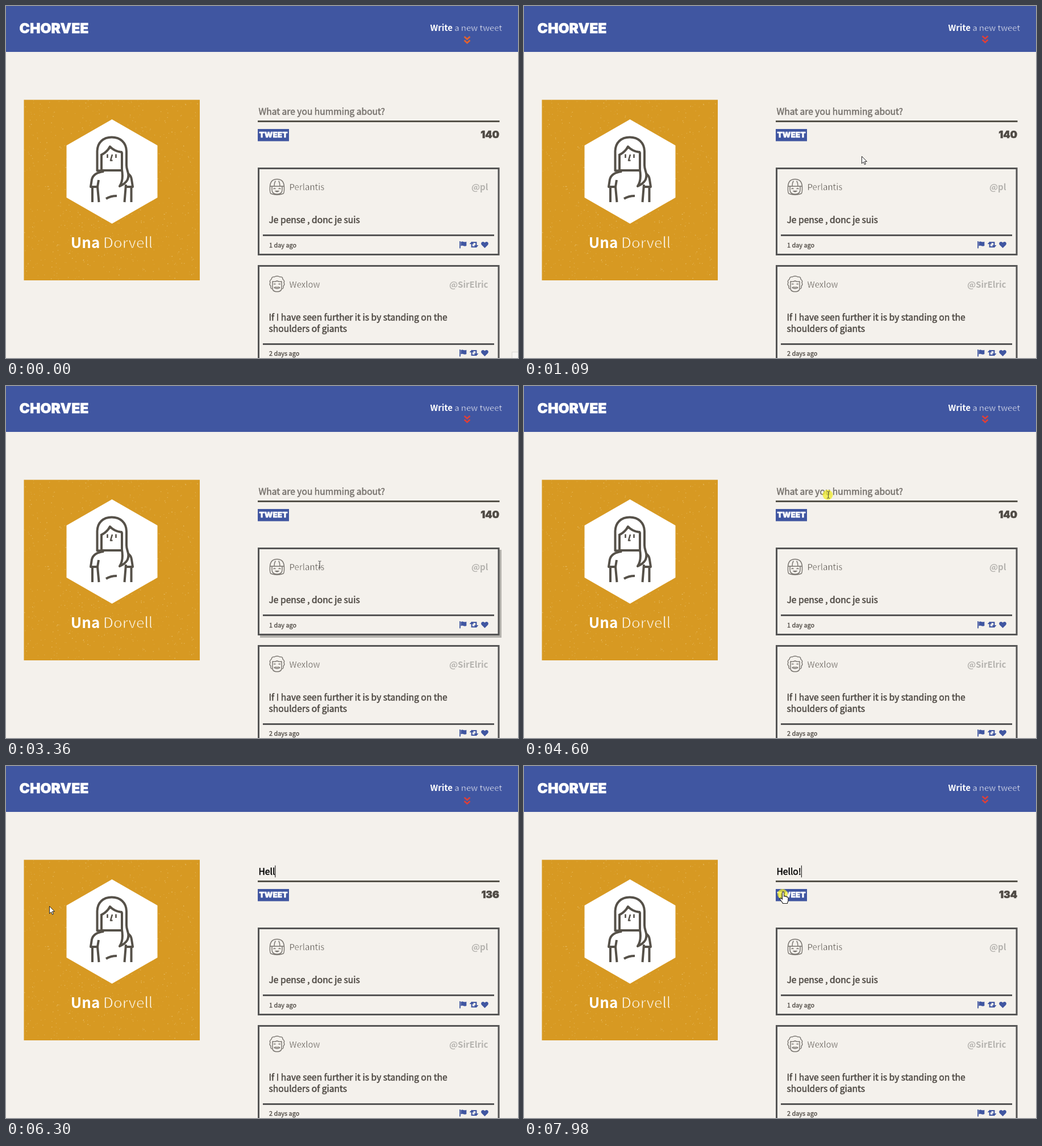
An HTML page that plays this animation: 901 px wide and 621 px high, repeating every 8000 ms.

```html
<!DOCTYPE html>
<html lang="en">
<head>
<meta charset="utf-8">
<title>Short messages</title>
<style>
html, body { margin: 0; width: 100%; height: 100%; overflow: hidden; background: #f4f1ec; }
svg { display: block; width: 100vw; height: 100vh; }
text {
  font: 400 15.6px "Noto Sans CJK JP", "Noto Sans CJK SC", "Noto Sans", sans-serif;
  color: #4f4a44; fill: currentColor; stroke: currentColor; stroke-width: .5; white-space: pre;
}
/* a stroke in the backdrop's colour thins the letters */
.light { font-size: 15px; stroke: #f4f1ec; stroke-width: .45; }
.bold { font-weight: 700; stroke: none; }
.end { text-anchor: end; }
.mid { text-anchor: middle; }
.white { color: #fff; }
.handle { font-size: 15px; font-weight: 700; color: #b5b3af; stroke: none; }
.date { font-size: 10.9px; stroke-width: .3; }
.block { font-family: Inter, "Liberation Sans", sans-serif; font-weight: 900; }
.line { fill: none; stroke: #565149; stroke-linecap: butt; stroke-linejoin: round; }
.thin { fill: none; stroke: #77736e; stroke-width: 1.4; stroke-linejoin: round; stroke-linecap: round; }
</style>
</head>
<body>
<svg viewBox="0 0 901 621">
  <defs>
    <g id="icons" fill="#4056a1">
      <path d="M798 -6h1.8v12.500h-1.800zM800.300 -4.800c3.500-2 5.500 1.500 10-.500v7.300c-4.500 2-6.500-1.500-10 .500z"/>
      <path d="M819.500 -5.500l4 4.500h-2.700v4h5l1.800 2h-9v-6h-3zM827.500 5.500l-4-4.500h2.700v-4h-5l-1.800-2h9v6h3z"/>
      <path d="M842.500 6l-5.300-5.300c-3-3.200.8-8.300 5.300-4.300c4.500-4 8.300 1.100 5.300 4.300z"/>
    </g>
    <path id="arrow" d="M.5.500v12.800l3-2.800 2 4.600 2-.9-2-4.500h4z" fill="#fff" stroke="#222" stroke-width="1"/>
    <path id="ibeam" d="M-2.500-6h1.700l.8.800.8-.8H2.500M0-5.200V5.200M-2.500 6h1.700l.8-.8.8.8H2.500" fill="none" stroke="#333" stroke-width=".9"/>
    <path id="hand" d="M-1.500 7V-2.500c0-2.200 3-2.200 3 0V4c.8-1 2.500-.8 2.700.5c1-.8 2.400-.3 2.500.8c1-.5 2.200.2 2.200 1.200v5c0 2-1.500 3-1.500 5H-.5c0-2-4.500-5-5-8c-.2-1.800 2-2 4 .5z" fill="#fff" stroke="#222" stroke-width="1.100"/>
  </defs>

  <rect width="901" height="621" fill="#f4f1ec"/>
  <rect width="901" height="81" fill="#4056a1"/>
  <text class="block white" x="23.500" y="47.800" style="font-size:24.700px">CHORVEE</text>
  <text class="light white end" x="873" y="44" style="stroke:#4056a1;font-size:14.900px"><tspan class="bold">Write</tspan> a new tweet</text>
  <path id="chevron" d="M-5-5.500L0-1L5-5.500M-5 1L0 5.500L5 1" fill="none" stroke-width="2.800"/>

  <rect x="31.500" y="165.500" width="309.500" height="318.500" fill="#d79922"/>
  <g id="specks" fill="#f3d898"></g>
  <path d="M186.500 200L266.500 246V338L186.500 384L106.500 338V246z" fill="#fff"/>
  <g class="line" stroke-width="4">
    <path d="M173 290.500H160.500V257C160.500 241 171 231.500 186 231.500S212 241 212 257V281C212 291 218 295 214 306Q211 313 200 318Q207 308 204 289"/>
    <path d="M168 261V290H204V258M167 263Q178 258 183 248Q191 257 205 258"/>
    <path d="M172 292Q154 294 151 306L149 319H161L163 307M161 319L163.500 346M152 319V346M211 319H223L221 306Q220 299 215 296M211 315L208.500 346M220.500 319V346"/>
    <path d="M176 340Q184 335 195 335"/>
    <path d="M178.500 261.500V268M193.500 261.500V268M187 262L184 272.500H187.500" stroke-width="2.600"/>
  </g>
  <text class="light white mid" x="186" y="427" style="stroke:#d79922;stroke-width:.8;font-size:26px"><tspan class="bold">Una</tspan> Dorvell</text>

  <text id="field" x="444.500" y="192"></text>
  <rect id="caret" y="175.500" width="1" height="21" fill="#000"/>
  <rect x="443" y="202" width="425.500" height="3" fill="#555249"/>
  <rect x="443" y="217" width="55" height="21.500" fill="#4056a1"/>
  <text class="block white mid" x="470.500" y="232.300" style="font-size:13.600px">TWEET</text>
  <text id="count" class="block end" x="868" y="232.800" style="font-size:17.600px"></text>

  <rect class="shade" x="447" y="289" width="425" height="155" fill="#b4b2ad"/>
  <rect class="shade" x="447" y="461" width="425" height="170" fill="#b4b2ad"/>
  <g fill="#f4f1ec" stroke="#555" stroke-width="3">
    <rect x="444.500" y="286.500" width="422.500" height="152"/>
    <rect x="444.500" y="458.500" width="422.500" height="180"/>
    <path d="M452 404.500H859M452 596.500H859"/>
  </g>

  <g class="thin">
    <path d="M466 331Q464 329 464.500 319Q465 305.500 477 305.500T489.500 319Q490 329 488 331Q477 335 466 331z"/>
    <path d="M468 318V324Q468 332 477 332T486 324V318M465 318H489M472 317.500Q472 312 474 309M482 317.500Q482 312 480 309M471 322.500q1.500-1.500 3 0M480 322.500q1.500-1.500 3 0M474 326.500q3 2.500 6 0z"/>
    <path d="M467 482q1-5 5-4q5-3 10 0q5-1 5 4q4 3 2 6q2 4-1 6q1 5-3 5q-1 5-8 5t-8-5q-4 0-3-5q-3-2-1-6q-2-3 2-6z"/>
    <path d="M469 498V486q4 1 8-1q4 2 8 1V498M471.500 490.500h2.500M480 490.500h2.500M472 497q2.500-2 5-.500q2.500-1.500 5 .500q-5 3-10 0"/>
  </g>
  <text class="light" x="498.500" y="325">Perlantis</text>
  <text class="handle end" x="848.500" y="325">@pl</text>
  <text x="462.500" y="383">Je pense , donc je suis</text>
  <text class="date" x="463" y="426">1 day ago</text>
  <use href="#icons" y="421"/>

  <text class="light" x="498.500" y="497">Wexlow</text>
  <text class="handle end" x="848.500" y="497">@SirElric</text>
  <text x="462.500" y="555">If I have seen further it is by standing on the</text>
  <text x="462.500" y="574.500">shoulders of giants</text>
  <text class="date" x="463" y="617">2 days ago</text>
  <use href="#icons" y="612"/>

  <rect id="corner" x="890.500" y="610.500" width="20" height="20" fill="#f8f6f3" stroke="#dcdad6"/>
  <circle id="click" r="9" fill="#f2ec2c" opacity=".75"/>
  <use id="cursor"/>
</svg>
<script>
const LOOP = 8000, BLINK = 1060, FOCUS = 4650;
const $ = id => document.getElementById(id);
const set = (el, attrs) => { for (const k in attrs) el.setAttribute(k, attrs[k]); };
const show = (el, on) => { el.style.visibility = on ? "visible" : "hidden"; };

// [time, x, y]
const path = [
  [380, 867, 612], [600, 800, 510], [800, 700, 390], [950, 632, 305], [1090, 594, 265],
  [1170, 586, 235], [1400, 556, 192], [1700, 547, 184], [2870, 547, 184], [3200, 553, 305],
  [3360, 552, 315], [3740, 552, 315], [4150, 542, 220], [4450, 535.5, 192], [4650, 535.5, 192],
  [4900, 400, 245], [5100, 220, 280], [5370, 76, 247], [6630, 76, 247], [6900, 4, 240],
  [7100, 90, 236], [7420, 402, 228], [7700, 456, 226]
];
const shapes = [[380, "arrow"], [1270, "ibeam"], [2960, "arrow"], [3230, "ibeam"], [3850, "arrow"],
  [4230, "ibeam"], [4730, "arrow"], [7560, "hand"]];
const clicks = [[4440, 4680], [7880, 8000]];
const keys = [5620, 5830, 6010, 6180, 6420, 6700];
// [time, angle in degrees] of the chevron's bob
const bob = [[0, 6], [1090, 336], [2260, 711], [3360, 1050], [4600, 1410], [6300, 1922], [7980, 2349], [8000, 2355]];

function sample(rows, t) {
  let i = 0;
  while (i < rows.length - 2 && t >= rows[i + 1][0]) i++;
  const a = rows[i], b = rows[i + 1];
  const k = Math.min(1, Math.max(0, (t - a[0]) / (b[0] - a[0])));
  return a.slice(1).map((v, j) => v + (b[j + 1] - v) * k);
}

function addSpecks() {
  let seed = 7, out = "";
  const rnd = () => (seed = seed * 16807 % 2147483647) / 2147483647;
  for (let i = 0; i < 900; i++) {
    const s = .7 + rnd() * .8;
    out += `<rect x="${32 + rnd() * 307}" y="${166 + rnd() * 316}" width="${s}" height="${s}" opacity="${.15 + rnd() * .45}"/>`;
  }
  $("specks").innerHTML = out;
}

function draw(t) {
  const [angle] = sample(bob, t);
  const y = 59.3 + 2 * Math.sin(angle * Math.PI / 180);
  set($("chevron"), { transform: `translate(811.5 ${y})`, stroke: t < 40 ? "#e2622f" : "#da403b" });
  show($("corner"), t < 40);

  const n = keys.filter(k => k <= t).length;
  const field = $("field");
  field.textContent = n ? "Hello!".slice(0, n) : "What are you humming about?";
  field.style.color = n ? "#000" : "#77736e";
  $("count").textContent = 140 - n;
  const last = n ? keys[n - 1] : FOCUS;
  show($("caret"), t > FOCUS && (t - last) % BLINK < BLINK / 2);
  set($("caret"), { x: 444.5 + (n ? field.getComputedTextLength() : 0) });

  const [px, py] = sample(path, t);
  const shape = shapes.filter(s => s[0] <= t).pop();
  show($("cursor"), shape);
  if (shape) set($("cursor"), { href: "#" + shape[1], transform: `translate(${px} ${py})` });
  show($("click"), clicks.some(c => t >= c[0] && t < c[1]));
  set($("click"), { cx: px - 1, cy: py });

  const over = (top, end) => !!shape && px > 443 && px < 868 && py > top && py < end;
  const shades = document.querySelectorAll(".shade");
  show(shades[0], over(285, 440));
  show(shades[1], over(457, 621));
}

addSpecks();
const start = performance.now();
function tick() {
  draw((performance.now() - start) % LOOP);
  requestAnimationFrame(tick);
}
tick();
</script>
</body>
</html>
```
